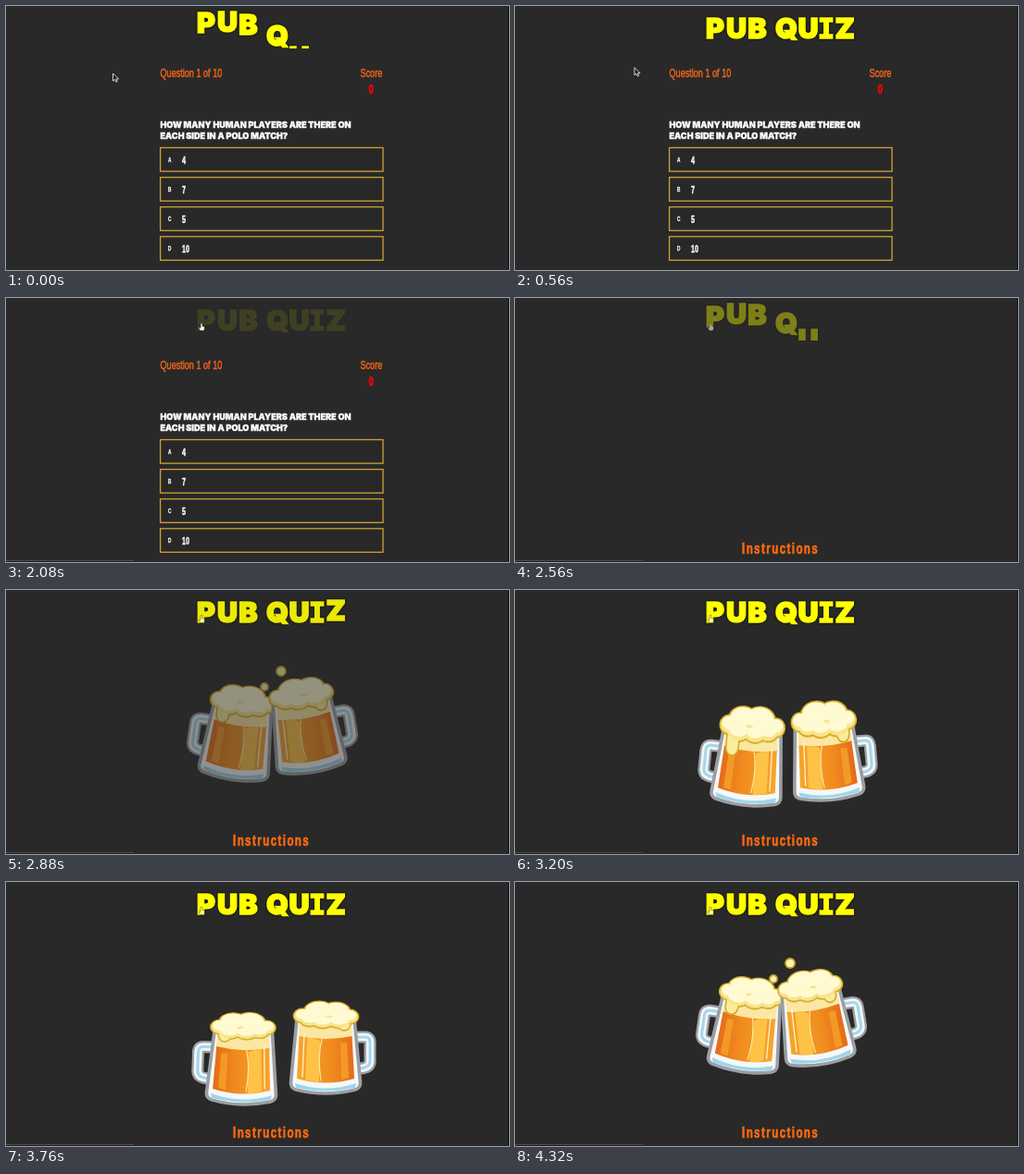
An HTML page that plays this animation: 543x286 px, repeating every 4400 ms.

```html
<!DOCTYPE html>
<html lang="en">
<head>
<meta charset="utf-8">
<title>Pub quiz</title>
<style>
html, body { margin: 0; width: 100%; height: 100%; overflow: hidden; background: #292929; }
svg { display: block; width: 100%; height: 100%; }
.block { font-family: Inter, "Open Sans", sans-serif; font-weight: 900; }
.slab { font-family: "DejaVu Sans Mono", monospace; font-weight: 700; }
.slim { font-family: "Liberation Sans", Arial, sans-serif; }
.bold { font-weight: 700; }
#title {
  fill: #ff0; stroke: #ff0; stroke-width: 1.6; font-size: 30.5px; text-anchor: middle;
  filter: drop-shadow(0 0 1px #000);
}
#ask { fill: #fff; stroke: #fff; stroke-width: .35; font-size: 9.1px; }
</style>
</head>
<body>
<svg viewBox="0 0 543 286" xmlns="http://www.w3.org/2000/svg">
  <defs>
    <clipPath id="band"><rect x="195" y="0" width="185" height="46"/></clipPath>
    <linearGradient id="ale" x1="0" x2="1">
      <stop offset="0" stop-color="#e56a1a"/>
      <stop offset=".4" stop-color="#f08c1e"/>
      <stop offset="1" stop-color="#f7a52c"/>
    </linearGradient>
  </defs>
  <rect width="543" height="286" fill="#292929"/>
  <rect x="542" width="1" height="286" fill="#0c0c0c"/>
  <g id="quiz">
    <g id="ask" class="block">
      <text x="166.5" y="132">HOW MANY HUMAN PLAYERS ARE THERE ON</text>
      <text x="166.5" y="144">EACH SIDE IN A POLO MATCH?</text>
    </g>
  </g>
  <g id="home">
    <g id="beers">
      <g id="left"></g>
      <g id="right"></g>
      <g id="drops" fill="#fdf0b0" stroke="#cfa52a" stroke-width="1.8">
        <circle cx="297" cy="88" r="5"/>
        <circle cx="279" cy="105" r="4"/>
      </g>
    </g>
  </g>
  <g clip-path="url(#band)"><g id="title" class="block"></g></g>
  <g id="status">
    <rect y="284" width="138" height="2" fill="#20181f"/>
    <rect y="284" width="138" height="1" fill="#504c50"/>
  </g>
  <path id="arrow" d="M0 0V8.200L2 6.500L3.400 9.300L4.700 8.700L3.400 6H6Z" fill="#151515" stroke="#fff" stroke-width=".8"/>
  <path id="hand" d="M-1 -3.500Q0 -4.500 1 -3.500V-.5L3.500 .2Q4 2.500 2.600 4.500H-1.200L-3.200 1.300Q-2.600 .2 -1 1.300Z" fill="#fff" stroke="#222" stroke-width=".7"/>
</svg>
<script>
const NS = 'http://www.w3.org/2000/svg';
const LOOP = 4400, TICK = 80;
const SLIM = 0.68;
const $ = id => document.getElementById(id);

function add(parent, tag, attrs, content) {
  const el = document.createElementNS(NS, tag);
  for (const key in attrs) el.setAttribute(key, attrs[key]);
  if (content) el.textContent = content;
  parent.appendChild(el);
  return el;
}

// Condensed lettering, thickened by a stroke of its own colour
function slim(parent, x, y, size, fill, content, bold, gap = 0) {
  add(parent, 'text', {
    class: bold ? 'slim bold' : 'slim', 'font-size': size, 'letter-spacing': gap,
    fill, stroke: fill, 'stroke-width': size * 0.04,
    transform: `translate(${x} ${y}) scale(${SLIM} 1)`
  }, content);
}

const clamp = (v, lo = 0, hi = 1) => Math.min(hi, Math.max(lo, v));
const ramp = (t, from, to) => clamp((t - from) / (to - from));
const show = (el, on) => el.setAttribute('visibility', on ? 'visible' : 'hidden');

// Interpolates rows of [time, ...values]
function track(rows, t, ease = p => p) {
  const last = rows[rows.length - 1];
  if (t <= rows[0][0]) return rows[0].slice(1);
  if (t >= last[0]) return last.slice(1);
  const i = rows.findIndex(row => row[0] > t);
  const a = rows[i - 1], b = rows[i];
  const p = ease(ramp(t, a[0], b[0]));
  return a.slice(1).map((v, k) => v + (b[k + 1] - v) * p);
}

const quiz = $('quiz'), home = $('home');
slim(quiz, 166.5, 76.5, 13.4, '#f0641a', 'Question 1 of 10');
slim(quiz, 382.5, 76.5, 13.4, '#f0641a', 'Score');
slim(quiz, 391.5, 95, 14, '#f00', '0', true);
['4', '7', '5', '10'].forEach((answer, i) => {
  const y = 153.5 + i * 32.1;
  add(quiz, 'rect', {
    x: 166.6, y, width: 240.4, height: 25.6, fill: '#282828', stroke: '#cfa136', 'stroke-width': 1.3
  });
  slim(quiz, 175, y + 15.2, 7, '#fff', 'ABCD'[i], true);
  slim(quiz, 190, y + 17, 10.8, '#fff', answer, true);
});
slim(home, 245, 277, 17, '#ff6a10', 'Instructions', true, 2.1);

const centers = [216, 239, 261.5, 293, 316.5, 336, 356];
const letters = [...'PUBQUIZ'].map((c, i) =>
  add($('title'), 'text', { x: centers[i], y: 35, class: c === 'I' ? 'slab' : 'block' }, c));

// Mug with its handle on the left, centred on the origin
function mug(root, flip, dripShare) {
  const g = add(root, 'g', { transform: `scale(${flip} 1)` });
  const handle = 'M-33 -20H-43Q-48 -20 -48 -14V7Q-47 14 -36 14';
  const body = 'M-31 -40H31L37.500 29Q38 35 32 37Q0 45 -32 37Q-38 35 -37.500 29Z';
  const line = (d, stroke, width) =>
    add(g, 'path', { d, stroke, fill: 'none', 'stroke-width': width, 'stroke-linecap': 'round' });
  const shape = (d, fill) => add(g, 'path', { d, fill });

  line(handle, '#9b9ea2', 13);
  line(handle, '#f1f6f9', 8.5);
  line(handle, '#a5d6ec', 3);
  add(g, 'path', { d: body, fill: '#f5f8f9', stroke: '#9b9ea2', 'stroke-width': 3.6 });
  shape('M-33 30Q0 41 33 30L32 35Q0 42 -32 35Z', '#9fd5eb');
  shape('M-28 -40H28L29 -18H-29Z', '#fbe7a2');
  shape('M-28.500 -21Q0 -15 28.500 -21L31 25Q0 34 -31 25Z', 'url(#ale)');
  shape('M-23 -14H-16L-17 26L-25 24Z', '#f39a26');
  shape('M6 -16Q13 -20 20 -19L22 26Q14 29 7 29Z', '#fdc246');
  line('M4 -18Q9 2 5 27', '#fde7a0', 1.2);
  line('M23 -24L25 23', '#fff1c4', 1.4);

  const foam = add(g, 'g', {});
  const puffs = [[-26, -42, 9, 7], [-11, -48, 15, 9], [7, -48, 16, 10], [25, -43, 9, 7],
    [-15, -37, 12, 7], [3, -36, 11, 6], [17, -38, 10, 6]];
  const pill = { x: -26, y: -40, width: 12, rx: 6 };
  const drips = [
    add(foam, 'rect', { ...pill, fill: '#fff3b4', stroke: '#d1aa2c', 'stroke-width': 3 })
  ];
  const cloud = (grow, fill, dy = 0) => puffs.forEach(([cx, cy, rx, ry]) =>
    add(foam, 'ellipse', { cx, cy: cy + dy, rx: rx + grow, ry: ry + grow, fill }));
  cloud(1.4, '#d6b02a');
  drips.push(add(foam, 'rect', { ...pill, fill: '#fbeb9c' }));
  cloud(-0.2, '#f9e48e');
  cloud(-1.6, '#fffad2', -1.8);

  return (x, y, turn, rise, drip) => {
    root.setAttribute('transform', `translate(${x} ${y}) rotate(${turn})`);
    foam.setAttribute('transform', `translate(0 ${-36 * (1 - rise)}) scale(1 ${rise})`);
    drips.forEach(d => d.setAttribute('height', 12 + drip * dripShare));
  };
}

const leftMug = mug($('left'), 1, 1);
const rightMug = mug($('right'), -1, 0.3);

// time, left x y turn, right x y turn, foam rise, drip
const toast = [
  [0, 250, 165, 8, 325, 157, -9, 1.15, 6],
  [120, 250, 165, 8, 325, 157, -9, 1.15, 6],
  [480, 254, 212, 4, 345, 208, -2, 1.5, 12],
  [560, 254, 212, 4, 345, 208, -2, 1.55, 13],
  [880, 255, 200, 2, 345, 188, 0, 1, 1],
  [1100, 255, 194, 2, 344, 180, 0, 1, 0],
  [1360, 250, 166, 7.5, 327, 158, -8, 1.1, 4],
  [1440, 250, 165, 8, 325, 157, -9, 1.15, 6]
];
const pointer = [[440, 115.5, 73], [880, 165, 50], [1120, 193.5, 34.5], [1440, 211, 31]];
const smooth = p => p * p * (3 - 2 * p);

// Rise from below the band with an overshoot
function rise(p) {
  const q = clamp(p) - 1;
  return -36 * (3.6 * q ** 3 + 2.6 * q * q);
}

function draw(t) {
  const onHome = t >= 2240;
  show(quiz, !onHome);
  show(home, t >= 2320);

  const entry = onHome ? 2343 : -199;
  letters.forEach((el, i) =>
    el.setAttribute('transform', `translate(0 ${rise((t - entry - i * 48) / 300)})`));
  $('title').setAttribute('opacity', onHome ? ramp(t, 2300, 2944) : 1 - 0.9 * ramp(t, 1760, 2080));

  const phase = (t - 2880 + 1440) % 1440;
  const [lx, ly, lr, rx, ry, rr, foam, drip] = track(toast, phase, smooth);
  leftMug(lx, ly, lr, foam, drip);
  rightMug(rx, ry, rr, foam, drip);
  $('drops').setAttribute('opacity', phase < 200 || phase > 1350 ? 1 : 0);
  $('beers').setAttribute('opacity', ramp(t, 2560, 3200));

  const [x, y] = track(pointer, t);
  const linked = t >= 1360;
  show($('arrow'), !linked);
  show($('hand'), linked);
  $(linked ? 'hand' : 'arrow').setAttribute('transform', `translate(${x} ${y})`);
  $('hand').setAttribute('opacity', onHome ? 0.6 : 1);
  show($('status'), t >= 1600);
}

let start;
function frame(now) {
  start ??= now;
  const t = (now - start) % LOOP;
  draw(Math.floor(t / TICK) * TICK);
  requestAnimationFrame(frame);
}
draw(0);
requestAnimationFrame(frame);
</script>
</body>
</html>
```
